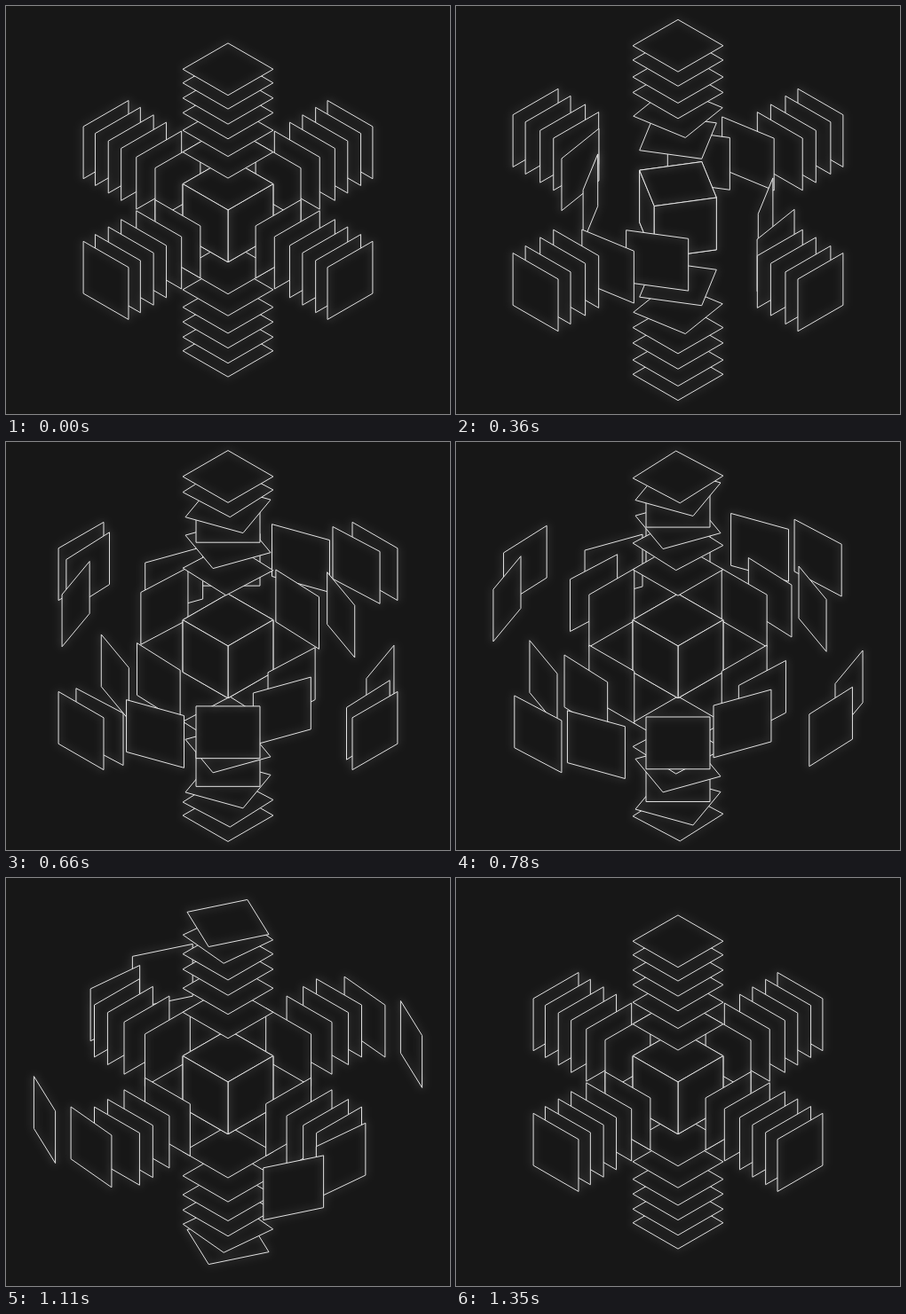
Animation of 500x460 px, one loop 1380 ms. Source, as an HTML page with a canvas:

```html
<!DOCTYPE html>
<html lang="en">
<head>
<meta charset="utf-8">
<title>Twisting shells</title>
<style>
  html, body { margin: 0; width: 100%; height: 100%; overflow: hidden; background: #171717; }
  canvas { display: block; }
</style>
</head>
<body>
<canvas id="stage" width="500" height="460"></canvas>
<script>
const canvas = document.getElementById('stage');
const ctx = canvas.getContext('2d');

const LOOP = 1380, STEP = 30;
const HALF = 36;                          // half the edge of a plate
const CX = 250, CY = 230;
const SIN = Math.sqrt(1 / 3), COS = Math.sqrt(2 / 3);   // isometric tilt
const TWIST = 600, DELAY = 120;           // twist length and lag per shell
const WIDEST = 675;                       // time of the largest spread

// Distance of each shell from the centre; the first one is the solid cube.
const CLOSED = [36, 80, 110, 134.2, 154.6, 175.5, 194.4];
const OPEN = [36, 106, 141, 168.5, 190, 214, 234];

const clamp = v => Math.max(0, Math.min(1, v));
const smooth = v => v * v * (3 - 2 * v);
const spread = t => 1 - Math.pow(clamp(Math.abs(t - WIDEST) / WIDEST), 2.25);

function project([x, y, z]) {
  return [CX + x, CY + y * SIN - z * COS];
}

function makePlate(center, u, v) {
  const corners = [[-1, -1], [1, -1], [1, 1], [-1, 1]].map(([a, b]) =>
    project(center.map((c, i) => c + HALF * (a * u[i] + b * v[i]))));
  return { corners, depth: center[1] * COS + center[2] * SIN };
}

function shellPlates(distance, angle) {
  const up = [0, 0, 1];
  const plates = [];
  for (let i = 0; i < 4; i++) {
    const a = Math.PI / 4 + i * Math.PI / 2 - angle;
    const normal = [Math.cos(a), Math.sin(a), 0];
    const side = [-normal[1], normal[0], 0];
    const edgeOn = Math.abs(side[0]) < 0.01;
    if (!edgeOn) plates.push(makePlate(normal.map(n => n * distance), side, up));
    if (i < 2) {
      plates.push(makePlate([0, 0, i ? -distance : distance], normal, side));
    }
  }
  return plates;
}

function drawPlate({ corners }) {
  ctx.beginPath();
  corners.forEach(([x, y]) => ctx.lineTo(x, y));
  ctx.closePath();
  ctx.fill();
  ctx.stroke();
}

function draw(t) {
  const open = spread(t);
  const plates = CLOSED.flatMap((near, k) => {
    const distance = near + (OPEN[k] - near) * open;
    const turn = smooth(clamp((t - k * DELAY) / TWIST));
    return shellPlates(distance, turn * Math.PI / 2);
  });
  plates.sort((a, b) => a.depth - b.depth);

  ctx.globalCompositeOperation = 'source-over';
  ctx.fillStyle = '#000';
  ctx.fillRect(0, 0, canvas.width, canvas.height);
  ctx.strokeStyle = '#c0c0c0';
  ctx.lineWidth = 1;
  ctx.lineJoin = 'round';
  plates.forEach(drawPlate);

  // Soft glow, then the background tone, both added as light.
  ctx.globalCompositeOperation = 'lighter';
  ctx.globalAlpha = 0.65;
  ctx.filter = 'blur(5px)';
  ctx.drawImage(canvas, 0, 0);
  ctx.filter = 'none';
  ctx.globalAlpha = 1;
  ctx.fillStyle = '#171717';
  ctx.fillRect(0, 0, canvas.width, canvas.height);
}

function tick() {
  const t = performance.now() % LOOP;
  draw(Math.floor(t / STEP) * STEP);
  requestAnimationFrame(tick);
}
tick();
</script>
</body>
</html>
```
